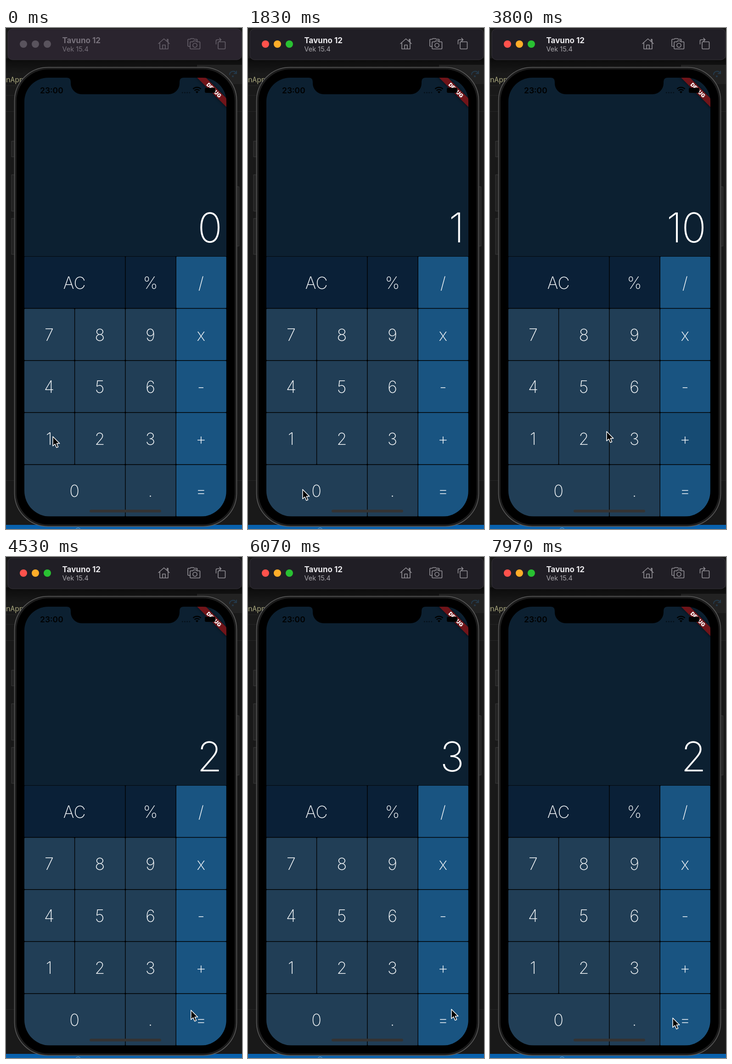
Write an HTML page that moves like this. It is 514 px wide and 1089 px high and loops after 8000 ms.

```html
<!DOCTYPE html>
<html lang="en">
<head>
<meta charset="utf-8">
<title>Calculator</title>
<style>
html, body { margin: 0; width: 100%; height: 100%; overflow: hidden; background: #191919; }
svg { display: block; width: 514px; height: 1089px; font-family: Inter, "Liberation Sans", sans-serif; }
.key { font-size: 36px; font-weight: 200; fill: #f4f7f9; text-anchor: middle; }
#display { font-size: 89px; font-weight: 200; fill: #fff; text-anchor: end; letter-spacing: -1px; }
#bar { --bg: #2a242e; --title: #77717b; --sub: #77717b; --icon: #67616b; --c0: #59535d; --c1: #59535d; --c2: #59535d; }
#bar.active { --bg: #201e25; --title: #ebeaed; --sub: #aaa8ad; --icon: #939197; --c0: #ff524c; --c1: #ffad29; --c2: #29c132; }
.icons { fill: none; stroke: var(--icon); stroke-width: 1.6; stroke-linejoin: round; stroke-linecap: round; }
</style>
</head>
<body>
<svg viewBox="0 0 514 1089">
  <defs>
    <clipPath id="screen"><path d="M40 160a52 52 0 0 1 52-52H428a52 52 0 0 1 52 52V1006a56 56 0 0 1-56 56H96a56 56 0 0 1-56-56z"/></clipPath>
    <filter id="blur" x="-20%" y="-100%" width="140%" height="300%"><feGaussianBlur stdDeviation="3"/></filter>
    <linearGradient id="shade" x2="0" y2="1"><stop stop-color="#0b0b0b"/><stop offset="1" stop-color="#191919"/></linearGradient>
  </defs>

  <!-- desktop behind the simulator -->
  <rect width="514" height="1089" fill="#191919"/>
  <rect y="66" width="514" height="34" fill="url(#shade)"/>
  <rect x="416" y="80" width="98" height="42" fill="#222"/>
  <path d="M0 125.500H24M0 146.500H22M0 181.500H20M0 983.500H20M502 181.500H514M502 983.500H514" stroke="#252525"/>
  <text x="0" y="118" font-size="16" fill="#a7a57c" font-family="Noto Sans Mono, monospace">nApp</text>
  <path d="M487 102a7.500 7.500 0 0 1 14-4m1-5v6h-6" fill="none" stroke="#24394a" stroke-width="2"/>
  <circle cx="494" cy="105" r="2" fill="#24394a"/>
  <rect y="1080" width="514" height="9" fill="#0861ad"/>
  <circle cx="157" cy="1092" r="5.500" fill="none" stroke="#79a9d2"/>

  <!-- window bar -->
  <g id="bar">
    <rect x="4" y="2" width="509" height="67" rx="10" style="fill:var(--bg)" stroke="#37323b"/>
    <g id="lights"></g>
    <text x="122.500" y="33" font-size="17" font-weight="700" style="fill:var(--title)">Tavuno 12</text>
    <text x="122.500" y="51" font-size="14.500" style="fill:var(--sub)">Vek 15.4</text>
    <g class="icons">
      <path d="M332 34L344 23.500 356 34M335 32V45.500H353V32M351 29V24.500H353V31M341 45V37H347V45"/>
      <path d="M400 40H397.500a1.500 1.500 0 0 1-1.500-1.500V26a1.500 1.500 0 0 1 1.500-1.500H401l1.500-1.500h6l1.500 1.500H415a1.500 1.500 0 0 1 1.500 1.500V28M402.500 30H407l1.500-2h6l1.500 2H421a1.500 1.500 0 0 1 1.500 1.500V44a1.500 1.500 0 0 1-1.500 1.500H402.500a1.500 1.500 0 0 1-1.500-1.500V31.500a1.500 1.500 0 0 1 1.500-1.500z"/>
      <circle cx="411.500" cy="37.500" r="4.500"/>
      <path d="M463.500 30H476a1.500 1.500 0 0 1 1.500 1.500V44a1.500 1.500 0 0 1-1.500 1.500H463.500a1.500 1.500 0 0 1-1.500-1.500V31.500a1.500 1.500 0 0 1 1.500-1.500zM457.500 35V28a2.500 2.500 0 0 1 2.500-2.500H468M465 22L468.500 25.500 465 29"/>
    </g>
  </g>

  <!-- phone body -->
  <g fill="#222" stroke="#3b3b3b">
    <path d="M18 246H12V280H18M18 319H12V398H18M18 414H12V492H18M503 345H507.500V474H503"/>
  </g>
  <rect x="18.500" y="85.500" width="484" height="998" rx="73" fill="#1c1c1c" stroke="#5d5d5d" stroke-width="1.500"/>
  <rect x="23" y="90" width="475" height="989" rx="69" fill="#000"/>

  <g clip-path="url(#screen)">
    <rect x="40" y="108" width="440" height="388.500" fill="#0c2031"/>
    <g id="keys"></g>
    <text id="display" x="470" y="466"></text>
    <g transform="translate(480 108) rotate(45)">
      <rect x="-50" y="31.600" width="100" height="13.500" filter="url(#blur)" opacity=".6"/>
      <rect x="-50" y="31.600" width="100" height="13.500" fill="#701419"/>
      <text y="42.600" font-size="11.500" font-weight="900" fill="#fff" text-anchor="middle">DEBUG</text>
    </g>
    <rect x="182" y="1047" width="156" height="6" rx="3" fill="#333"/>
  </g>
  <path d="M132 107H387V108Q378 108 378 117V120a24 24 0 0 1-24 24H165a24 24 0 0 1-24-24V117Q141 108 132 108z"/>
  <text x="74" y="142" font-size="17.500" font-weight="600">23:00</text>
  <path d="M383 140.500H401" stroke="#061019" stroke-width="2.500" stroke-dasharray="2.500 2.700"/>
  <path d="M407.500 132.500a12 12 0 0 1 17 0M410.500 136a7.600 7.600 0 0 1 11 0" fill="none" stroke="#000" stroke-width="2.500"/>
  <path d="M416 142l-3-3.200a4.200 4.200 0 0 1 6 0z"/>
  <rect x="433" y="130" width="23" height="11" rx="3"/>

  <path id="cursor" d="M0 0V20.500L4.700 16.300 8 24 11.600 22.500 8.400 15H14.800z" fill="#000" stroke="#fff" stroke-width="1.500" stroke-linejoin="round"/>
</svg>
<script>
const LOOP = 8000;
const $ = id => document.getElementById(id);
const COL = 110.3, ROW = 113.2;
const DARK = '#0a2037', DIGIT = '#213e56', OPERATOR = '#195481';

// label, column, row, column span
const layout = [['AC', 0, 0, 2], ['%', 2, 0], ['0', 0, 4, 2], ['.', 2, 4]];
[...'789456123'].forEach((c, i) => layout.push([c, i % 3, 1 + Math.floor(i / 3)]));
[...'/x-+='].forEach((c, i) => layout.push([c, 3, i]));

const keyMarkup = ([label, col, row, span = 1]) => {
  const x = 40 + col * COL, y = 497 + row * ROW, w = span * COL - 1.4;
  const fill = col === 3 ? OPERATOR : row === 0 ? DARK : DIGIT;
  const box = `x="${x}" y="${y}" width="${w}" height="111.700" rx="1.500"`;
  return `<rect ${box} fill="${fill}"/><rect ${box} class="shade" data-key="${label}" opacity="0"/>
    <text class="key" x="${x + w / 2 - 0.5}" y="${y + 69.5}">${label}</text>`;
};
$('keys').innerHTML = '<rect x="40" y="496.500" width="440" height="566"/>' + layout.map(keyMarkup).join('');
$('lights').innerHTML = [0, 1, 2].map(i =>
  `<circle cx="${38 + 26 * i}" cy="35" r="8" style="fill:var(--c${i})"/>`).join('');

const presses = [['1', 1180], ['0', 1950], ['+', 3550], ['2', 4080], ['=', 4680],
  ['x', 5110], ['3', 5690], ['=', 6240], ['/', 6930], ['2', 7490]];
const readings = [[0, '0'], [1240, '1'], [2010, '10'], [4140, '2'], [4740, '12'],
  [5750, '3'], [6300, '36'], [7550, '2']];
// time, x, y of the pointer
const path = [[0, 102, 888], [1420, 102, 888], [1790, 119, 1003], [2330, 119, 1003],
  [2770, 417, 721], [3200, 424, 882], [3640, 424, 882], [3800, 254, 877], [3960, 204, 882],
  [4240, 204, 882], [4600, 424, 996], [4790, 424, 996], [5080, 421, 659], [5310, 421, 659],
  [5610, 315, 884], [5840, 315, 884], [6070, 443, 983], [6200, 428, 996], [6480, 428, 996],
  [6850, 424, 546], [7060, 424, 546], [7370, 206, 884], [7640, 206, 884], [7950, 398, 1002], [8000, 398, 1002]];

const clamp = v => Math.min(1, Math.max(0, v));
const ease = p => p * p * (3 - 2 * p);
const pressLevel = age => clamp(age / 80) * clamp((500 - age) / 220);

function pointer(t) {
  const i = path.findIndex(p => p[0] > t);
  const [t0, x0, y0] = path[i - 1], [t1, x1, y1] = path[i];
  const p = ease((t - t0) / (t1 - t0));
  return [x0 + (x1 - x0) * p, y0 + (y1 - y0) * p];
}

const shades = [...document.querySelectorAll('.shade')];
function draw(t) {
  $('bar').classList.toggle('active', t >= 1000);
  $('display').textContent = readings.filter(r => r[0] <= t).pop()[1];
  for (const shade of shades) {
    const levels = presses.filter(p => p[0] < t && p[0] + 500 > t && p[0 ] === shade.dataset.key);
    const active = presses.filter(([key]) => key === shade.dataset.key).map(([, at]) => pressLevel(t - at));
    shade.setAttribute('opacity', 0.11 * Math.max(0, ...active));
  }
  $('cursor').setAttribute('transform', `translate(${pointer(t)})`);
}

const start = performance.now();
function tick() {
  draw((performance.now() - start) % LOOP);
  requestAnimationFrame(tick);
}
tick();
</script>
</body>
</html>
```
